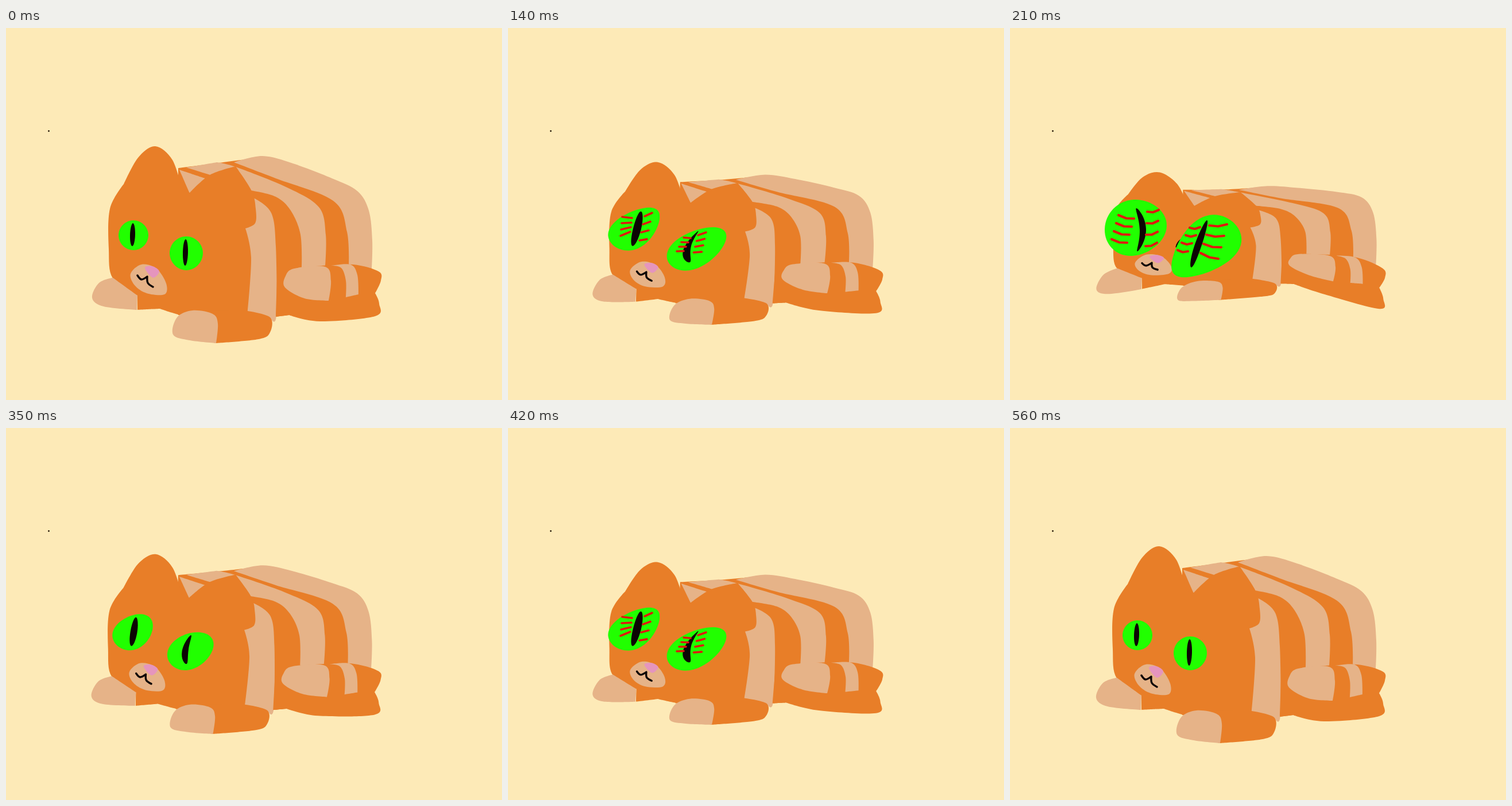
Animation, 864 px wide and 648 px high, one loop 980 ms. Source, as an HTML page:

```html
<!DOCTYPE html>
<html lang="en">
<head>
<meta charset="utf-8">
<title>Squashed cat</title>
<style>
html, body { margin: 0; width: 100%; height: 100%; overflow: hidden; background: #fdeab7; }
svg { display: block; width: 100%; height: 100%; }
path { stroke-linecap: round; stroke-linejoin: round; }
</style>
</head>
<body>
<svg viewBox="0 0 864 648">
  <circle cx="74.5" cy="179.5" r="1.4" fill="#2a1c0a"/>
  <g id="cat"></g>
</svg>
<script>
const ORANGE = '#e87e28', TAN = '#e6b388', GREEN = '#21ff00', BLACK = '#0c0504', PINK = '#e595bd', RED = '#e0180e';
const STEP = 70, LOOP = 980, LAST_STEP = 8;

// Squash level of each step: 0 upright, 1 squashed, 2 flat.
const LEVELS = [0, 0.5, 1, 2];

// Outlines of the upright cat; "!" marks a sharp corner.
const body = [
  [ORANGE, '300,244! 370,235 440,226! 610,300! 605,415! 600,480! 493,500! 470,503! 421,495! 300,500!'],
  [TAN, '397,234! 447,223 500,236 568,262 612,284 632,318 638,370 637,420! 597,415! 594,355 570,301 470,262'],
  [TAN, '314,243! 367,234! 400,242 490,278 545,312 557,360 556,415! 515,417! 513,360 496,318 470,294 427,283! 356,256!'],
  [TAN, '302,247! 347,262! 433,297! 462,322 470,380 471,500 462,507! 421,494! 400,400! 320,288!'],
  [ORANGE, '500,420! 550,414 605,412 649,424 653,440 643,462! 650,480 643,502 547,511 493,500! 470,503! 472,440!'],
  [TAN, '487,432 502,419 556,416 566,440 562,475! 520,471 486,452'],
  [TAN, '566,414! 600,412 612,430 614,464! 592,469! 592,440 584,418'],
  [ORANGE, '205,272! 230,226 260,206 290,230 307,283! 320,287! 355,256 400,241! 428,284 435,315 434,340 417,349! '
    + '427,400 421,493! 380,520! 303,500 268,489! 229,491! 229,466! 186,436 179,385 181,315'],
  [TAN, '186,435! 162,444 150,470 170,485 228,491! 229,466!'],
  [ORANGE, '340,492! 421,493! 460,504 460,530 440,542 365,549! 340,540!'],
  [TAN, '298,504 325,492 360,498 369,515 366,549! 320,544 291,534'],
  [TAN, '217,428 236,412 262,419 279,445 276,464 245,462 224,448'],
  [PINK, '242,418 255,415 267,424 256,435'],
];
const mouth = '229,431! 236,438 246,433! 247,444 256,451!';

// Left, top, right and bottom points at each level.
const eyes = [
  [GREEN, '196,361 222,335 248,361 222,387', '175,355 235,314 263,338 217,387', '165,350 216,299 273,345 213,397'],
  [GREEN, '285,392 314,363 343,392 314,422', '277,393 335,350 380,367 322,421', '284,398 347,326 402,378 317,433'],
  [BLACK, '216,361 221,340 225,360 220,380', '216,358 230,320 233,345 219,379', '226,352 220,314 237,350 222,389'],
  [BLACK, '308,391 313,368 317,391 312,414', '305,388 331,354 319,380 317,408', '321,380 343,335 334,378 316,417'],
];

// Rows of veins: first start point, step to the next row, length, rise and its change per row.
const veins = [
  { level: 1, x: 199, y: 329, stepX: -1, stepY: 11, length: 17, rise: 2, turn: -3 },
  { level: 1, x: 238, y: 328, stepX: -3, stepY: 14, length: 13, rise: -6, turn: 1.3 },
  { level: 1, x: 306, y: 365, stepX: -4, stepY: 8, length: 12, rise: 1, turn: -0.5 },
  { level: 1, x: 331, y: 361, stepX: -2.5, stepY: 10, length: 14, rise: -5, turn: 1.3 },
  { level: 2, x: 189, y: 326, stepX: -4, stepY: 14, length: 27, rise: 6, turn: 0 },
  { level: 2, x: 239, y: 320, stepX: -1, stepY: 20, length: 20, rise: -3, turn: -1 },
  { level: 2, x: 313, y: 348, stepX: -7, stepY: 13, length: 18, rise: -1, turn: 1 },
  { level: 2, x: 347, y: 344, stepX: -5, stepY: 16, length: 31, rise: -2, turn: 4 },
];
const ROWS = 4;

const parse = text => text.split(' ').map(item => {
  const [x, y] = item.split(',').map(parseFloat);
  return { x, y, corner: item.endsWith('!') };
});

const mix = (a, b, t) => a + (b - a) * t;

// Squeezes towards a level line, most around the middle of the cat.
function squash({ x, y, corner }, level) {
  const give = 0.38 - (x - 420) ** 2 * (x < 420 ? 3.6e-6 : 6e-6);
  const flat = Math.max(0, level - 1), lean = Math.min(level, 2 - level);
  const pull = give * level / 2 * (mix(375, 345, flat) - y);
  return {
    x: x + give * (lean * (23 - 0.096 * y) + flat * 4),
    y: y + pull * (pull > 0 ? 1.14 : 1),
    corner,
  };
}

// Smooth curve through the points, with no handles at corners.
function curve(points, tension = 1 / 6, closed = true) {
  const count = points.length;
  const at = i => points[(i + count) % count];
  const handle = (i, side) => {
    const p = at(i), k = p.corner ? 0 : side * tension;
    return `${p.x + k * (at(i + 1).x - at(i - 1).x)} ${p.y + k * (at(i + 1).y - at(i - 1).y)}`;
  };
  let d = `M${points[0].x} ${points[0].y}`;
  for (let i = 0; i < count - !closed; i++) {
    d += `C${handle(i, 1)} ${handle(i + 1, -1)} ${at(i + 1).x} ${at(i + 1).y}`;
  }
  return d;
}

function eyePoints(poses, level) {
  const from = Math.floor(level), t = level - from;
  const next = poses[Math.min(from + 1, 2)];
  return poses[from].map((p, i) => ({ x: mix(p.x, next[i].x, t), y: mix(p.y, next[i].y, t) }));
}

function veinRows({ level, x, y, stepX, stepY, length, rise, turn }) {
  const kink = level === 2 ? 2.5 : 0;
  let d = '';
  for (let i = 0; i < ROWS; i++) {
    const half = (rise + turn * i) / 2;
    d += `M${x + stepX * i} ${y + stepY * i}l${length * 0.5} ${half + kink}`;
    d += `l${length * 0.5} ${half - kink}`;
  }
  return d;
}

function addPath(attributes) {
  const path = document.createElementNS('http://www.w3.org/2000/svg', 'path');
  for (const name in attributes) path.setAttribute(name, attributes[name]);
  return document.getElementById('cat').appendChild(path);
}

const line = (stroke, width, d = '') => addPath({ d, stroke, fill: 'none', 'stroke-width': width });

const shapes = [];
const addShape = (path, outline) => shapes.push({ path, outline });

for (const [fill, text] of body) {
  const points = parse(text);
  addShape(addPath({ fill }), level => curve(points.map(p => squash(p, level))));
}
const mouthPoints = parse(mouth);
addShape(line(BLACK, 3.4), level => curve(mouthPoints.map(p => squash(p, level)), 1 / 6, false));

const extras = [{ level: 2, path: line(BLACK, 3, 'M290 381Q292 373 298 369') }];
for (const [fill, ...texts] of eyes) {
  const poses = texts.map(parse);
  addShape(addPath({ fill }), level => curve(eyePoints(poses, level), 0.27));
}
for (const group of veins) {
  extras.push({ level: group.level, path: line(RED, 3 + group.level * 0.6, veinRows(group)) });
}

let shown;
function pose(level) {
  if (level === shown) return;
  shown = level;
  for (const { path, outline } of shapes) path.setAttribute('d', outline(level));
  for (const extra of extras) extra.path.style.display = extra.level === level ? '' : 'none';
}

const start = performance.now();
function tick() {
  const time = (performance.now() - start) % LOOP;
  const step = Math.min(LAST_STEP, Math.floor(time / STEP));
  pose(LEVELS[step % LEVELS.length]);
  requestAnimationFrame(tick);
}
tick();
</script>
</body>
</html>
```
